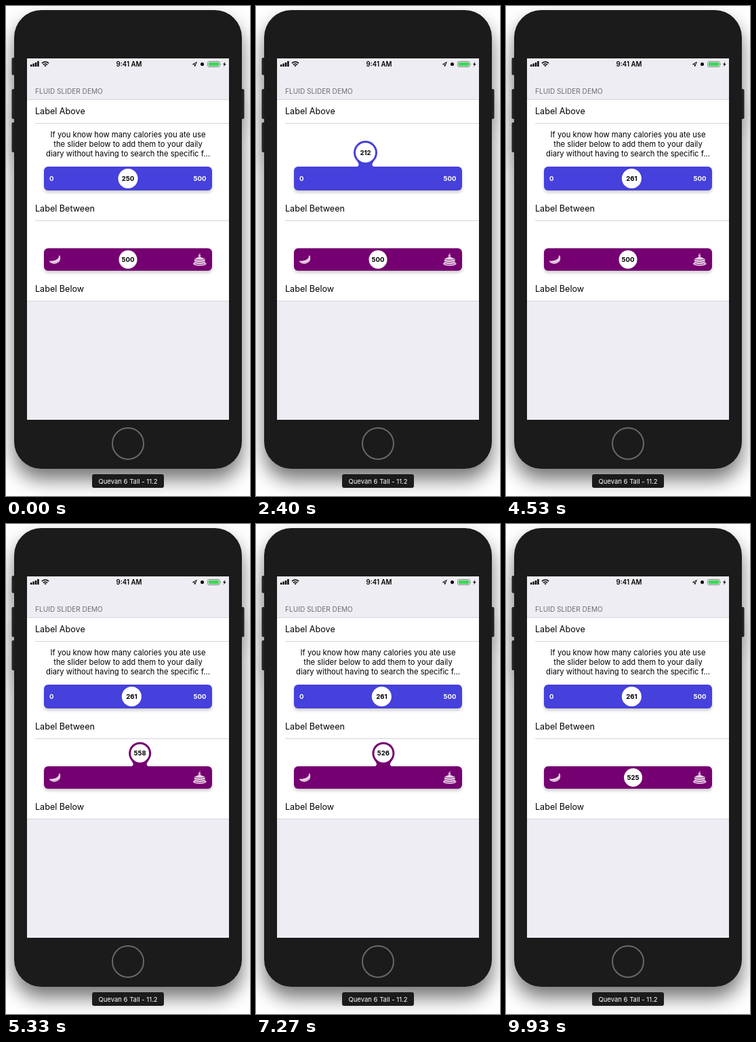
Write an HTML page that moves like this. It is 360x720 px and loops after 10 s.

```html
<!DOCTYPE html>
<html lang="en">
<head>
<meta charset="utf-8">
<title>Fluid slider demo</title>
<style>
html, body { margin: 0; width: 100%; height: 100%; overflow: hidden; background: #fff; }
svg { display: block; position: absolute; left: 0; top: 0; }
text { font-family: Inter, "Liberation Sans", sans-serif; }
.row { font-size: 12.6px; }
.hint { font-size: 11.25px; text-anchor: middle; }
.bold { font-size: 9.6px; font-weight: 700; }
.mid { text-anchor: middle; }
.phone { filter: drop-shadow(0 16px 14px rgba(0,0,0,.54)); }
.bar { filter: drop-shadow(0 3px 2px rgba(0,0,0,.2)); }
</style>
</head>
<body>
<svg width="360" height="720" viewBox="0 0 360 720">
  <g class="phone" fill="#1b1b1b">
    <path fill="#222" d="M8.500 78q0-2 2-2h3v25.500h-3q-2 0-2-2zM8.500 124q0-2 2-2h3v44h-3q-2 0-2-2zM8.500 173q0-2 2-2h3v44h-3q-2 0-2-2zM351.500 124q0-2-2-2h-3v44h3q2 0 2-2z"/>
    <rect x="12" y="6" width="336" height="674" rx="40"/>
  </g>
  <circle cx="180" cy="643" r="23" fill="none" stroke="#686868" stroke-width="2"/>
  <rect x="31" y="77" width="298" height="531" fill="#eeedf3"/>
  <rect x="31" y="137" width="298" height="296" fill="#fff"/>
  <path d="M31 137.500H329M43 172.500H329M43 315.500H329M31 433.500H329" stroke="#d5d4da"/>

  <!-- status bar -->
  <path d="M36 86h2.400v3H36zM39.400 84.500h2.400v4.500h-2.400zM42.800 83h2.400v6h-2.400zM46.200 81h2.400v8h-2.400z"/>
  <g fill="none" stroke="#000" stroke-width="1.6">
    <path d="M52.900 84.200q5-4.400 10.200 0M54.900 86.300q3.100-2.600 6.200 0"/>
  </g>
  <path d="M56.300 87.500q1.700-1.300 3.400 0L58 89.300z"/>
  <text class="mid" x="181.500" y="89" font-size="9.7" font-weight="600">9:41 AM</text>
  <path d="M275.500 85.700L281.300 82.500L278.600 88.800L278.300 85.900z" fill="none" stroke="#000"/>
  <circle cx="289.500" cy="85.500" r="2.500"/>
  <rect x="297.500" y="81.500" width="18" height="8" rx="2" fill="none" stroke="#777" stroke-width=".8"/>
  <rect x="298.800" y="82.800" width="15.400" height="5.400" rx="1" fill="#3fd45a"/>
  <path d="M316.500 84v3q1.300-1.500 0-3z" fill="#777"/>
  <path d="M323.500 82l-3.500 4h2l-1 3.300 3.700-4.300h-2.200z"/>

  <text x="43" y="129" font-size="10.1" fill="#6d6d72">FLUID SLIDER DEMO</text>
  <text class="row" x="43" y="158.500">Label Above</text>
  <text class="row" x="43" y="301.700">Label Between</text>
  <text class="row" x="43" y="419.700">Label Below</text>
  <g id="hint" class="hint">
    <text x="180" y="192.500">If you know how many calories you ate use</text>
    <text x="180" y="206.500">the slider below to add them to your daily</text>
    <text x="180" y="220.500">diary without having to search the specific f...</text>
  </g>

  <g id="calories" fill="#4640dc">
    <rect class="bar" x="56" y="236" width="248" height="35" rx="6"/>
    <g class="bold" fill="#fff">
      <text x="64" y="257.200">0</text>
      <text x="295.500" y="257.200" text-anchor="end">500</text>
    </g>
  </g>
  <g id="treats" fill="#750071">
    <rect class="bar" x="56" y="356" width="248" height="33" rx="6"/>
    <path d="M64 374.500q9 1 13.500-4.500l.6-3.500 1.600.4q1.700 6.300-2.200 9.600-5.600 4.300-11.500 1-2.200-1.600-2-3z" fill="#ead3e7"/>
    <path d="M65.500 376.700q7.500 2.500 12.500-2.700" fill="none" stroke="#c893c2" stroke-width=".8"/>
    <ellipse cx="285.800" cy="378.700" rx="10" ry="3.200" fill="#d5acd1"/>
    <path d="M278 371.500l7.500-3.300 8 3.300v6.800q-8 2.700-15.500 0z" fill="#ecd8e9"/>
    <path d="M278 372q7 2.600 15.500 0M278 375.300q7.500 2.600 15.500 0M279 378.500q7 2 13.500 0" fill="none" stroke="#963c91" stroke-width="1.200"/>
    <circle cx="285.500" cy="367" r="1.900" fill="#d9b0d4"/>
    <path d="M285.300 365.500q-.2-2 1.700-2.300" fill="none" stroke="#d9b0d4" stroke-width=".8"/>
  </g>

  <rect x="127" y="688" width="106" height="20" rx="3" fill="#1b1b1b"/>
  <text class="mid" x="180" y="701.700" font-size="9.500" fill="#fff">Quevan 6 Tall - 11.2</text>
</svg>
<script>
const LOOP = 10000;
const clamp = n => Math.min(1, Math.max(0, n));
const smooth = n => n * n * (3 - 2 * n);
const ramp = (t, from, to) => smooth(clamp((t - from) / (to - from)));

// keys: [ms, value]; lift: rise start/end, fall start/end
const sliders = [
  { id: 'calories', top: 236, rest: 253.5, up: 215.5, r: 14.5, mid: 250, px: .487,
    lift: [1200, 1500, 3800, 4100],
    keys: [[1350, 250], [1900, 300], [2400, 212], [2950, 150], [3700, 261]] },
  { id: 'treats', top: 356, rest: 372.5, up: 337, r: 13.5, mid: 500, px: .302,
    lift: [4850, 5150, 9350, 9650],
    keys: [[5000, 500], [6070, 756], [7400, 520], [8530, 650], [9250, 525]] }
];
const hint = document.getElementById('hint');

function add(parent, tag, attrs) {
  const el = document.createElementNS(parent.namespaceURI, tag);
  for (const name in attrs) el.setAttribute(name, attrs[name]);
  return parent.appendChild(el);
}

for (const s of sliders) {
  const group = document.getElementById(s.id);
  s.neck = add(group, 'path', {});
  s.knob = add(group, 'g', {});
  add(s.knob, 'circle', { r: s.r + 3 });
  add(s.knob, 'circle', { r: s.r, fill: '#fff' });
  s.label = add(s.knob, 'text', { y: 3.4, class: 'bold mid', fill: '#000' });
}

function valueAt(keys, t) {
  let value = keys[0][1];
  for (let i = 1; i < keys.length; i++) {
    const [t0, v0] = keys[i - 1], [t1, v1] = keys[i];
    if (t >= t0) value = v0 + (v1 - v0) * ramp(t, t0, t1);
  }
  return value;
}

function neckPath(x, top, y, radius) {
  const gap = top - y;
  if (gap <= 0) return '';
  const chord = Math.sqrt(Math.max(0, radius * radius - gap * gap));
  const foot = Math.max(13, chord + 4), waist = Math.max(9, chord);
  const side = d => `${x + d * waist} ${top - 4}`;
  return `M${x - foot} ${top + .5}C${x - waist} ${top - 1} ${side(-1)} ${x - 13} ${top - 9}` +
    `H${x + 13}C${side(1)} ${x + waist} ${top - 1} ${x + foot} ${top + .5}Z`;
}

function draw(t) {
  for (const s of sliders) {
    const [a, b, c, d] = s.lift;
    const lift = ramp(t, a, b) - ramp(t, c, d);
    const value = valueAt(s.keys, t);
    const x = 180 + (value - s.mid) * s.px;
    const y = s.rest + (s.up - s.rest) * lift;
    s.knob.setAttribute('transform', `translate(${x} ${y})`);
    s.neck.setAttribute('d', neckPath(x, s.top, y, s.r + 3));
    s.label.textContent = Math.round(value);
    if (s.id === 'calories') hint.style.opacity = 1 - lift;
  }
}

const start = performance.now();
function frame() {
  draw((performance.now() - start) % LOOP);
  requestAnimationFrame(frame);
}
frame();
</script>
</body>
</html>
```
